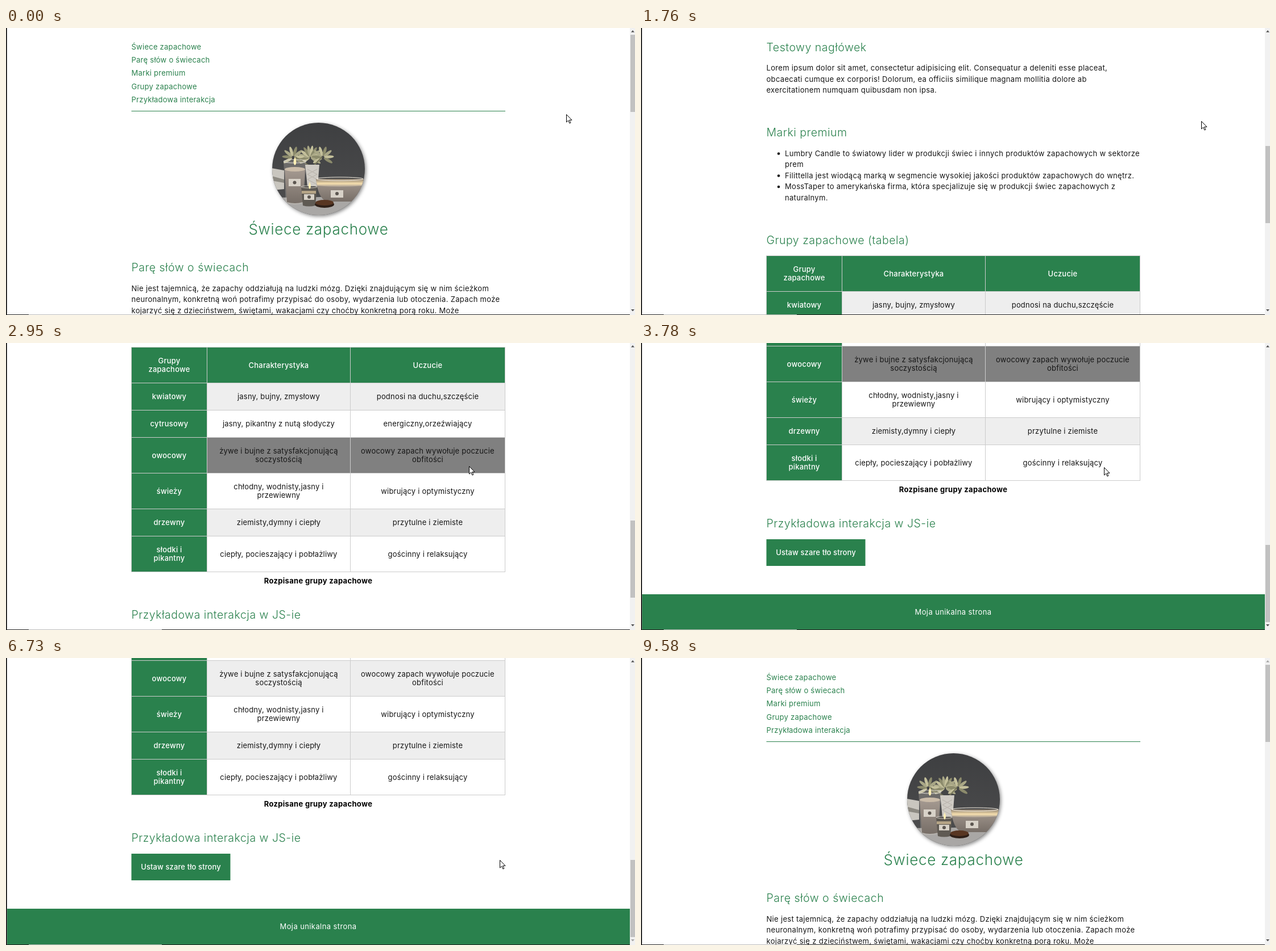
Animation of 1106x506 px, one loop 9670 ms. Source, as an HTML page:

```html
<!DOCTYPE html>
<html lang="pl">
<head>
<meta charset="utf-8">
<style>
  html, body { margin: 0; width: 100%; height: 100%; overflow: hidden; background: #fff }
  svg { display: block }
  text { font-family: Inter, "Open Sans", sans-serif; white-space: pre }
  #photo { filter: drop-shadow(2px 2px 3px #0007) }
</style>
</head>
<body>
<svg id="stage" width="1106" height="506" viewBox="0 0 1106 506">
  <defs>
    <clipPath id="round"><circle cx="549.5" cy="249.5" r="81.5"/></clipPath>
    <linearGradient id="wall" x2="0" y2="1"><stop stop-color="#3e3f41"/><stop offset="1" stop-color="#4e4e4f"/></linearGradient>
    <linearGradient id="wax" x2="0" y2="1"><stop stop-color="#a59a91"/><stop offset="1" stop-color="#776e67"/></linearGradient>
    <linearGradient id="glow" x2="0" y2="1"><stop stop-color="#8b7d6d"/><stop offset=".6" stop-color="#f6dfae"/><stop offset="1" stop-color="#a59a91"/></linearGradient>
  </defs>
  <rect id="paper" x="2" width="1095" height="506" fill="#fff"/>
  <g id="page">
    <path d="M220.5 147.5H878" stroke="#2a814d"/>
    <g id="photo"><g clip-path="url(#round)">
      <rect x="467" y="167" width="165" height="165" fill="url(#wall)"/>
      <path d="M467 300L632 298V332H467z" fill="#a9a7a5"/>
      <path d="M467 248l22 4v33l-22 2z" fill="#c9c6bf"/>
      <path d="M467 262l22 6v6l-22-4z" fill="#8d8a82"/>
      <g id="leaves"/>
      <path d="M526 242h25l-3 38h-18z" fill="#cfcbc4"/>
      <path d="M530 250l17 9m-17 0l17 9m-17 0l17 9m0-27l-17 9m17 0l-17 9" stroke="#b5afa7" fill="none"/>
      <path d="M488 235h40l-5 75q-15 4-31 0z" fill="#d8d2c844"/>
      <path d="M490 250h36l-4 58q-14 4-28 0z" fill="url(#wax)"/>
      <ellipse cx="508" cy="250" rx="18" ry="4" fill="#cbbca9"/>
      <ellipse cx="508" cy="236" rx="20" ry="3" fill="none" stroke="#dedad4"/>
      <path d="M545 267h84q-2 30-17 40h-49q-15-8-18-40z" fill="url(#wax)"/>
      <path d="M545 267h84l-2 12q-40 4-80 0z" fill="url(#glow)"/>
      <ellipse cx="587" cy="267" rx="41" ry="3" fill="none" stroke="#f5eee2"/>
      <path d="M519 281h28l-3 33q-11 3-22 0z" fill="#5f5a53"/>
      <path d="M520 288h25v5h-25z" fill="#b5a486"/>
      <ellipse cx="533" cy="281" rx="14" ry="2" fill="none" stroke="#c5c0b8"/>
      <ellipse cx="560" cy="312" rx="17" ry="6" fill="#2f2018"/>
      <ellipse cx="560" cy="309" rx="16" ry="5" fill="#583622"/>
      <path d="M508 228q-5 11 0 15q5-4 0-15zM534 272q-4 9 0 13q4-4 0-13z" fill="#fff0b5"/>
      <path d="M497 267h21v13h-21zM524 294h18v10h-18zM571 287h22v13h-22z" fill="#d8d2c8"/>
      <g fill="#5c5650"><circle cx="507.5" cy="273.5" r="3"/><circle cx="533" cy="299" r="3"/><circle cx="582" cy="293" r="3"/></g>
    </g></g>
    <path d="M220.5 1636H394.5V1683H220.5zM2 1733H1097V1797H2z" fill="#2a814d"/>
  </g>
  <rect width="1.6" height="506"/>
  <path d="M0 505.5H40M274 505.5H1097" stroke="#222"/>
  <path d="M40 505.5H274" stroke="#bbb"/>
  <rect x="1097" width="9" height="506" fill="#f1f1f1"/>
  <rect id="thumb" x="1098" width="8" height="136" fill="#c1c1c1"/>
  <path id="up" d="M1099 7.5l3-3.5 3 3.5z"/>
  <path id="down" d="M1099 496l3 3.5 3-3.5z"/>
  <g id="cursor" fill="#fff" stroke="#000">
    <path id="arrow" d="M.5.5V14l3.200-3 2.200 5 2-.9-2.200-4.800H10z"/>
    <path id="hand" d="M5 1.500a1.700 1.700 0 0 1 3.400 0V8l6.500 1.500q2 .7 1.700 3l-1 4.500v2H6.500L1 12q-.6-2 1.200-2.200L5 12z"/>
  </g>
</svg>
<script>
const LOOP = 9670, MAX = 1291, GREEN = '#2a814d';
const $ = id => document.getElementById(id);
const page = $('page');

function add(tag, attrs, parent = page) {
  const el = document.createElementNS('http://www.w3.org/2000/svg', tag);
  for (const k in attrs) el.setAttribute(k, attrs[k]);
  return parent.appendChild(el);
}
// y is the visual middle of the line
function text(s, x, y, { size = 13, fill = '#161616', gap = .32, anchor = 'start', weight = 400 } = {}) {
  add('text', { x, y: y + size * .36, fill, 'font-size': size, 'letter-spacing': gap,
    'text-anchor': anchor, 'font-weight': weight }).textContent = s;
}
const lines = (s, x, y, step, style) =>
  s.split('\n').forEach((line, i) => text(line, x, y + i * step, style));
const heading = (s, y) => text(s, 220.5, y, { size: 19.5, fill: GREEN, weight: 300, gap: .5 });
const para = (s, y, x = 220.5) => lines(s, x, y, 19.5);

lines('Świece zapachowe\nParę słów o świecach\nMarki premium\nGrupy zapachowe\nPrzykładowa interakcja',
  220.5, 34.3, 23.2, { fill: GREEN, gap: .25 });
text('Świece zapachowe', 549.5, 356, { size: 26, fill: GREEN, anchor: 'middle', weight: 300, gap: .7 });

heading('Parę słów o świecach', 423);
para(`Nie jest tajemnicą, że zapachy oddziałują na ludzki mózg. Dzięki znajdującym się w nim ścieżkom
neuronalnym, konkretną woń potrafimy przypisać do osoby, wydarzenia lub otoczenia. Zapach może
kojarzyć się z dzieciństwem, świętami, wakacjami czy choćby konkretną porą roku. Może
także przywoływać miłe wspomnienia i poprawiać samopoczucie. Świece zapachowe nadają domom
przytulny charakter, tworzą ciepły klimat oraz wypełniają wnętrza aromatem. Zapachy, dobrane do
pomieszczeń, umożliwią odprężenie się, niwelują stres. Ponadto dzięki zapachom, palące się świece
znacząco wpłyną na nasz nastrój. Dostępność różnorodnych woni może pobudzić do działania (np.
zapachy owocowe), uspokoić (np. zapachy leśne) czy też po prostu wypełnić mieszkanie ulubionym
aromatem (np. cynamonu lub lawendy). Ponadto świece są doskonałym elementem dekoracyjnym, a
dzięki różnorodności dostępnych produktów pomogą zbudować niepowtarzalną atmosferę wnętrza.
Warto także wspomnieć, że świece zapachowe wysokiej jakości są produktami naturalnymi,
bezpiecznymi dla zdrowia. Stanowią cenną alternatywę dla odświeżaczy powietrza, których
syntetyczne, sztuczne zapachy mogą posiadać szkodliwe substancje.`, 460.3);

heading('Testowy nagłówek', 769);
para(`Lorem ipsum dolor sit amet, consectetur adipisicing elit. Consequatur a deleniti esse placeat,
obcaecati cumque ex corporis! Dolorum, ea officiis similique magnam mollitia dolore ab
exercitationem numquam quibusdam non ipsa.`, 805.5);

heading('Marki premium', 919);
para(`Lumbry Candle to światowy lider w produkcji świec i innych produktów zapachowych w sektorze
prem
Filittella jest wiodącą marką w segmencie wysokiej jakości produktów zapachowych do wnętrz.
MossTaper to amerykańska firma, która specjalizuje się w produkcji świec zapachowych z
naturalnym.`, 956, 253);
for (const y of [956.5, 995.5, 1015]) add('circle', { cx: 242, cy: y, r: 2.3, fill: '#111' });

heading('Grupy zapachowe (tabela)', 1109);
const colX = [220.5, 353.5, 605.5, 877.5];
const rowY = [1136.5, 1199.5, 1247.5, 1295.5, 1358.5, 1421.5, 1469.5, 1532.5];
const table = [
  ['Grupy\nzapachowe', 'Charakterystyka', 'Uczucie'],
  ['kwiatowy', 'jasny, bujny, zmysłowy', 'podnosi na duchu,szczęście'],
  ['cytrusowy', 'jasny, pikantny z nutą słodyczy', 'energiczny,orzeźwiający'],
  ['owocowy', 'żywe i bujne z satysfakcjonującą\nsoczystością', 'owocowy zapach wywołuje poczucie\nobfitości'],
  ['świeży', 'chłodny, wodnisty,jasny i\nprzewiewny', 'wibrujący i optymistyczny'],
  ['drzewny', 'ziemisty,dymny i ciepły', 'przytulne i ziemiste'],
  ['słodki i\npikantny', 'ciepły, pocieszający i pobłażliwy', 'gościnny i relaksujący'],
];
const cells = table.map((row, r) => row.map((s, c) => {
  const head = !r || !c, x = colX[c], y = rowY[r], w = colX[c + 1] - x, h = rowY[r + 1] - y;
  const rect = add('rect', { x, y, width: w, height: h, stroke: '#ccc', fill: head ? GREEN : 'none' });
  const extra = s.includes('\n') ? 7.6 : 0;
  lines(s, x + w / 2, y + h / 2 - extra, 15.2,
    { anchor: 'middle', gap: .2, fill: head ? '#fff' : '#161616', weight: head ? 500 : 400 });
  return rect;
}));
text('Rozpisane grupy zapachowe', 549, 1548, { anchor: 'middle', weight: 700, fill: '#000' });

heading('Przykładowa interakcja w JS-ie', 1608.3);
text('Ustaw szare tło strony', 307.5, 1659, { anchor: 'middle', fill: '#fff', gap: .1, weight: 500 });
text('Moja unikalna strona', 549, 1764, { anchor: 'middle', fill: '#fff', gap: .4 });

// three fans of leaves above the pot
const leaves = $('leaves');
for (const [cx, cy, n] of [[535, 229, 12], [505, 229, 8], [557, 229, 8]])
  for (let i = 0; i < n; i++)
    add('ellipse', { cx, cy: cy - 11, rx: 2.6, ry: 6 + n / 3, fill: ['#c4c09b', '#8c8b6c', '#a9a786'][i % 3],
      transform: `rotate(${i * 240 / (n - 1) - 120} ${cx} ${cy})` }, leaves);
add('path', { d: 'M537 246L508 228M539 246L556 228', stroke: '#77765a', 'stroke-width': 2 }, leaves);

const scrollKeys = [[0, 1], [40, 1], [690, 370], [1010, 370], [1580, 735], [1780, 735], [2660, 1040],
  [2700, 1040], [2950, 1129], [3560, 1129], [3640, 1210], [3780, 1290], [3850, MAX], [6860, MAX],
  [7260, 930], [7300, 930], [7690, 556], [7830, 330], [8050, 330], [8240, 0], [LOOP, 0]];
const mouseKeys = [[0, 985, 152], [1700, 985, 152], [1760, 985, 164], [2050, 985, 164], [2620, 814, 217],
  [3230, 814, 217], [3640, 814, 219], [3860, 814, 219], [4600, 600, 350], [5160, 367, 373],
  [6300, 367, 373], [6730, 868, 356], [6860, 914, 340], [8660, 914, 340], [9250, 375, 515], [LOOP, 375, 515]];

function at(keys, t) {
  const i = keys.findIndex(k => k[0] > t), [a, b] = [keys[i - 1], keys[i]];
  const u = (t - a[0]) / (b[0] - a[0]);
  return a.slice(1).map((v, j) => v + (b[j + 1] - v) * u);
}

function draw(now) {
  const t = now % LOOP;
  const scroll = Math.round(at(scrollKeys, t)[0]);
  const [mx, my] = at(mouseKeys, t).map(Math.round), py = my + scroll;

  page.setAttribute('transform', `translate(0 ${-scroll})`);
  $('thumb').setAttribute('y', Math.round(12 + scroll * 344 / MAX));
  $('up').setAttribute('fill', scroll ? '#505050' : '#a3a3a3');
  $('down').setAttribute('fill', scroll < MAX ? '#505050' : '#a3a3a3');
  $('paper').setAttribute('fill', t < 5340 || t >= 6070 ? '#fff' : t < 6000 ? '#808080' : '#c0c0c0');

  // the hovered row is not refreshed while the last wheel scroll runs
  const frozen = t > 3500 && t < 3900;
  const over = mx > colX[0] && mx < colX[3];
  cells.forEach((row, r) => {
    const hot = frozen ? r === 3 : over && py >= rowY[r] && py < rowY[r + 1];
    if (r) for (const cell of row.slice(1))
      cell.setAttribute('fill', hot ? '#808080' : r % 2 ? '#eee' : 'none');
  });

  const hand = mx > 220 && mx < 395 && py > 1636 && py < 1683;
  $('hand').style.display = hand ? '' : 'none';
  $('arrow').style.display = hand ? 'none' : '';
  $('cursor').setAttribute('transform', `translate(${hand ? mx - 7 : mx} ${my})`);
  requestAnimationFrame(() => draw(performance.now() - start));
}
const start = performance.now();
draw(0);
</script>
</body>
</html>
```
